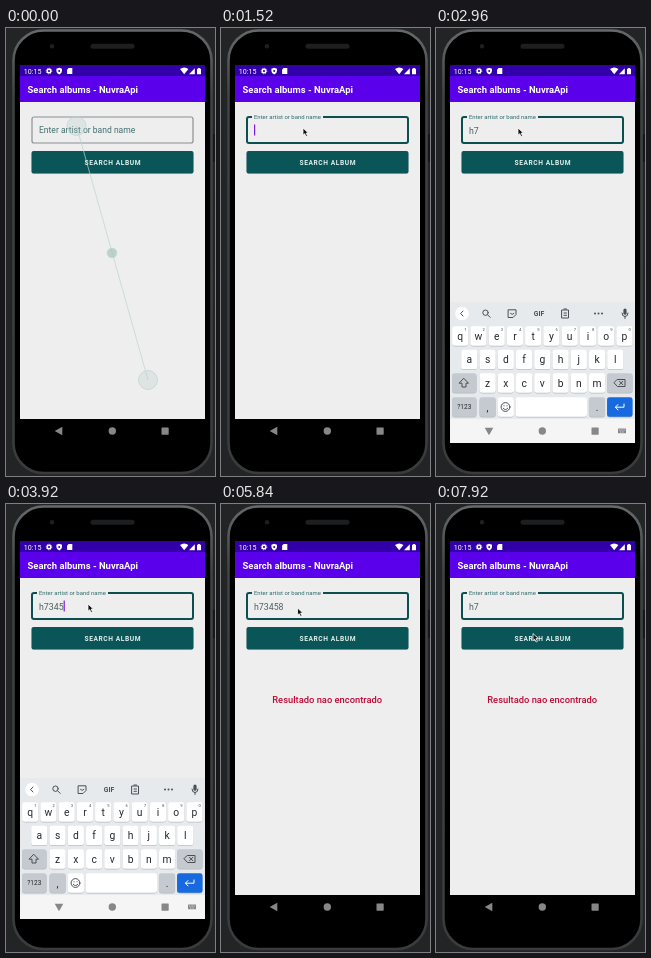
Recreate the animation shown at these times as an HTML page. Size 209 px wide and 448 px high, loop 8 s.

```html
<!DOCTYPE html>
<html lang="en">
<head>
<meta charset="utf-8">
<title>Album search</title>
<style>
html, body { margin: 0; width: 100%; height: 100%; overflow: hidden; background: #232425; }
svg { display: block; width: 209px; height: 448px; font-family: Roboto, sans-serif; }
.mid { text-anchor: middle; }
.icon { fill: none; stroke: #4a4f54; stroke-width: 1; stroke-linecap: round; stroke-linejoin: round; }
</style>
</head>
<body>
<svg viewBox="0 0 209 448">
  <defs>
    <clipPath id="screen"><rect x="14" y="37" width="185" height="378"/></clipPath>
    <clipPath id="buttonClip"><rect x="25.5" y="123" width="162" height="22.5" rx="2"/></clipPath>
    <linearGradient id="metal" x2="0" y2="1">
      <stop stop-color="#66696b"/><stop offset=".15" stop-color="#3f4142"/><stop offset="1" stop-color="#393b3c"/>
    </linearGradient>
  </defs>

  <g id="phone">
    <rect width="209" height="448" fill="#232425"/>
    <rect x="206" y="106" width="3" height="28" fill="#151617"/>
    <rect x="7.5" y="2.5" width="198" height="442.5" rx="30" fill="#000" stroke="url(#metal)" stroke-width="2.6"/>
    <rect x="84.5" y="15.8" width="44" height="5" rx="2.5" fill="#1d1e1f"/>
    <circle cx="46" cy="18.3" r="2.2" fill="#1d2023"/>
  </g>

  <g clip-path="url(#screen)">
    <rect x="14" y="48" width="185" height="343" fill="#eee"/>
    <rect x="14" y="37" width="185" height="11" fill="#3200a8"/>
    <rect x="14" y="48" width="185" height="26" fill="#5b00ea"/>
    <g fill="#fff">
      <text x="17.8" y="45.7" font-size="7.1">10:15</text>
      <circle cx="43" cy="43" r="1.8" fill="none" stroke="#fff" stroke-width="1.4"/>
      <circle cx="43" cy="43" r="2.8" fill="none" stroke="#fff" stroke-width=".8" stroke-dasharray="1.2 1"/>
      <path d="M53.2 39.7l2.8 1v2.4q0 2.2-2.8 3.5q-2.8-1.3-2.8-3.5v-2.4z"/>
      <circle cx="53.2" cy="43" r="1" fill="#3200a8"/>
      <path d="M62.6 40h3.7v6h-5.2v-4.5z"/>
      <path d="M174 41q4.2-3 8.4 0l-4.2 5.2z"/>
      <path d="M183 46.2h5.8v-6z"/>
      <path d="M191 40.8h1.1v-.9h1.8v.9h1.1v5.5h-4z"/>
      <text x="21.5" y="65.2" font-size="9.45" font-weight="600">Search albums - NuvraApi</text>
    </g>

    <rect id="outline" x="26" y="89" width="161" height="26" rx="2" fill="none"/>
    <rect id="notch" x="31" y="86" width="71" height="5" fill="#eee"/>
    <text id="label" x="33">Enter artist or band name</text>
    <text id="entry" x="33" y="105.9" font-size="8.8" fill="#4b6061"></text>
    <rect id="caret" y="96.5" width="1.2" height="11" fill="#7a20e0"/>

    <rect x="25.5" y="123.6" width="162" height="22.5" rx="2" fill="#000" opacity=".12"/>
    <rect x="25.5" y="123" width="162" height="22.5" rx="2" fill="#0a5557"/>
    <g clip-path="url(#buttonClip)"><circle id="ripple" cx="104" cy="134" fill="#3c7f7d"/></g>
    <text class="mid" x="106.8" y="136.9" font-size="6.65" font-weight="600" letter-spacing=".56" fill="#e2efee">SEARCH ALBUM</text>
    <text id="error" class="mid" x="106.2" y="199" font-size="9.35" font-weight="500" fill="#bf0a35">Resultado nao encontrado</text>

    <g id="touch" fill="#a4c4be" fill-opacity=".22" stroke="#bdd4d0" stroke-width=".7">
      <path d="M70.5 98L142 352"/>
      <circle cx="70.5" cy="98" r="9.5"/>
      <circle cx="106" cy="225" r="4.8" fill-opacity=".7"/>
      <circle cx="142" cy="352" r="9.5"/>
    </g>

    <g id="keyboard">
      <rect x="14" y="274" width="185" height="118" fill="#e7eaed"/>
      <circle cx="26" cy="285.5" r="6.8" fill="#fff"/>
      <g class="icon">
        <path d="M27 283l-2.4 2.5l2.4 2.5"/>
        <circle cx="49.5" cy="284.7" r="2.7"/><path d="M51.6 286.8l2.6 2.6"/>
        <path d="M72.5 281.8h7.5v4.7l-3 3h-4.5zM74.5 285.5q1.7 2 3.4 0"/>
        <path d="M126 282h6.5v8h-6.5zM128 281h2.5M128 285h2.5M128 287.3h2.5"/>
        <path d="M186 285q0 3.5 3 3.5t3-3.5M189 288.5v2"/>
      </g>
      <rect x="187.4" y="280.5" width="3.2" height="6.3" rx="1.6" fill="#4a4f54"/>
      <g fill="#4a4f54"><circle cx="159" cy="285.5" r="1"/><circle cx="162.5" cy="285.5" r="1"/><circle cx="166" cy="285.5" r="1"/></g>
      <text class="mid" x="103" y="288" font-size="6.8" font-weight="700" fill="#4a4f54">GIF</text>
      <g id="keys"></g>
      <g class="icon">
        <path d="M28 350.5l4.5 4.7h-2.5v3.8h-4v-3.8h-2.5z"/>
        <path d="M181.5 351.5h7.5v7h-7.5l-3.3-3.5zM183.5 353.3l3.3 3.4M186.8 353.3l-3.3 3.4"/>
        <circle cx="69.5" cy="379" r="4.4"/>
        <path d="M67.3 380.3q2.2 2.7 4.4 0M68 377.7v.2M71 377.7v.2"/>
        <path d="M188 376v3.2h-8.5M182 376.5l-2.6 2.7l2.6 2.7" stroke="#fff"/>
      </g>
    </g>

    <rect id="navLight" x="14" y="391" width="185" height="24" fill="#f5f5f5"/>
    <g fill="#858789">
      <path id="back" d="M48.7 403l7.6-4.3v8.6z"/>
      <circle cx="106.3" cy="403" r="3.7"/>
      <rect x="155.5" y="399.5" width="7.2" height="7.2" rx=".6"/>
      <g id="switcher">
        <rect x="182" y="400.5" width="8" height="4.8" rx=".5"/>
        <path d="M183 402h6M184 404h4" stroke="#f5f5f5" stroke-width=".7" stroke-dasharray="1 .6"/>
      </g>
    </g>
  </g>

  <path id="pointer" d="M0 0v7.2l1.7-1.5l1.4 2.8l1.4-.7l-1.4-2.7h2.3z" fill="#111" stroke="#fff" stroke-width=".8"/>
</svg>

<script>
const LOOP = 8000, STEP = 80;
const el = Object.fromEntries([...document.querySelectorAll('[id]')].map(e => [e.id, e]));

function set(node, attrs) {
  for (const name in attrs) node.setAttribute(name, attrs[name]);
}

function add(tag, attrs, text = '') {
  const node = document.createElementNS(el.keys.namespaceURI, tag);
  set(node, attrs);
  node.textContent = text;
  el.keys.append(node);
}

function addKey(x, y, label = '', width = 16.2, fill = '#fff', size = 10.3) {
  const box = { x: x - width / 2, width, height: 19.5, rx: 2.4 };
  add('rect', { ...box, y: y - 9, fill: '#b5babf' });
  add('rect', { ...box, y: y - 9.7, fill });
  add('text', { x, y: y + size * .34, class: 'mid', 'font-size': size, fill: '#25282b' }, label);
}

function addRow(letters, x, y) {
  [...letters].forEach((letter, i) => addKey(x + i * 18.25, y, letter));
}

const GREY = '#c5cad0';
addRow('qwertyuiop', 24.2, 308);
addRow('asdfghjkl', 33.3, 331.5);
addRow('zxcvbnm', 51.6, 355);
[...'1234567890'].forEach((digit, i) =>
  add('text', { x: 28.2 + i * 18.25, y: 303.4, 'font-size': 4.2, fill: '#4a4f54' }, digit));
addKey(28.3, 355, '', 24.5, GREY);
addKey(183.8, 355, '', 25.5, GREY);
addKey(28.3, 379, '?123', 24.5, GREY, 6.5);
addKey(51.6, 379, ',', 16.2, GREY);
addKey(69.8, 379);
addKey(115.3, 379, '', 71.5);
addKey(161, 379, '.', 16.2, GREY);
addKey(183.8, 379, '', 25.5, '#1769e0');

const ease = p => p * p * (3 - 2 * p);

// Eased value between neighbouring [time, value] steps.
function tween(t, steps) {
  const next = steps.findIndex(s => s[0] > t);
  if (next < 0) return steps.at(-1)[1];
  if (next === 0) return steps[0][1];
  const [t0, a] = steps[next - 1], [t1, b] = steps[next];
  return a + (b - a) * ease((t - t0) / (t1 - t0));
}

// Value of the latest step reached.
const held = (t, steps) => steps.findLast(s => s[0] <= t)[1];

const typed = [
  [0, ''], [2480, 'h'], [2800, 'h7'], [3360, 'h73'], [3600, 'h734'], [3840, 'h7345'], [4160, 'h73458'],
  [6640, 'h7345'], [6800, 'h734'], [6960, 'h73'], [7120, 'h7']
];
const pointerX = [[320, 104], [720, 82], [4320, 82], [4720, 97], [5520, 97], [5840, 76.5], [7360, 76.5], [7680, 97]];
const pointerY = [[320, 152], [720, 100], [4320, 100], [4720, 129.5], [5520, 129.5], [5840, 104], [7360, 104], [7680, 129.5]];

function draw(t) {
  const focused = t >= 1360;
  const float = tween(t, [[1360, 0], [1520, 1]]);
  const open = tween(t, [[1600, 0], [1880, 1], [5040, 1], [5280, 0]]);
  const turn = tween(t, [[1760, 0], [2080, 1], [5040, 1], [5280, 0]]);

  set(el.touch, { opacity: held(t, [[0, 1], [80, .5], [160, 0]]) });
  set(el.pointer, {
    transform: `translate(${tween(t, pointerX)} ${tween(t, pointerY)})`,
    opacity: t >= 320 ? 1 : 0
  });

  set(el.outline, { stroke: focused ? '#0c4f50' : '#8c9292', 'stroke-width': focused ? 2 : 1.2 });
  set(el.notch, { opacity: float });
  set(el.label, {
    y: 104.8 - 13.8 * float,
    'font-size': 8.55 - 2.6 * float,
    fill: focused ? '#2b696a' : '#42706f'
  });

  const text = held(t, typed);
  el.entry.textContent = text;
  const caretOn = (t >= 1440 && t < 4880 && (t - 1440) % 1000 < 500) || (t >= 6160 && t < 7680 && (t - 6160) % 1000 < 500);
  set(el.caret, {
    x: 33 + (text ? el.entry.getComputedTextLength() : 0),
    opacity: caretOn ? 1 : 0
  });

  set(el.ripple, {
    r: tween(t, [[4880, 0], [4960, 71], [5040, 95]]),
    opacity: tween(t, [[5040, 1], [5280, 0]])
  });
  set(el.error, { opacity: t >= 5440 ? 1 : 0 });

  set(el.keyboard, { transform: `translate(0 ${141 * (1 - open)})`, opacity: open > 0 ? 1 : 0 });
  set(el.navLight, { opacity: open });
  set(el.switcher, { opacity: open });
  set(el.back, { transform: `rotate(${-90 * turn} 53 403)` });
}

const start = performance.now();
function frame() {
  const t = (performance.now() - start) % LOOP;
  draw(Math.floor(t / STEP) * STEP);
  requestAnimationFrame(frame);
}
frame();
</script>
</body>
</html>
```
